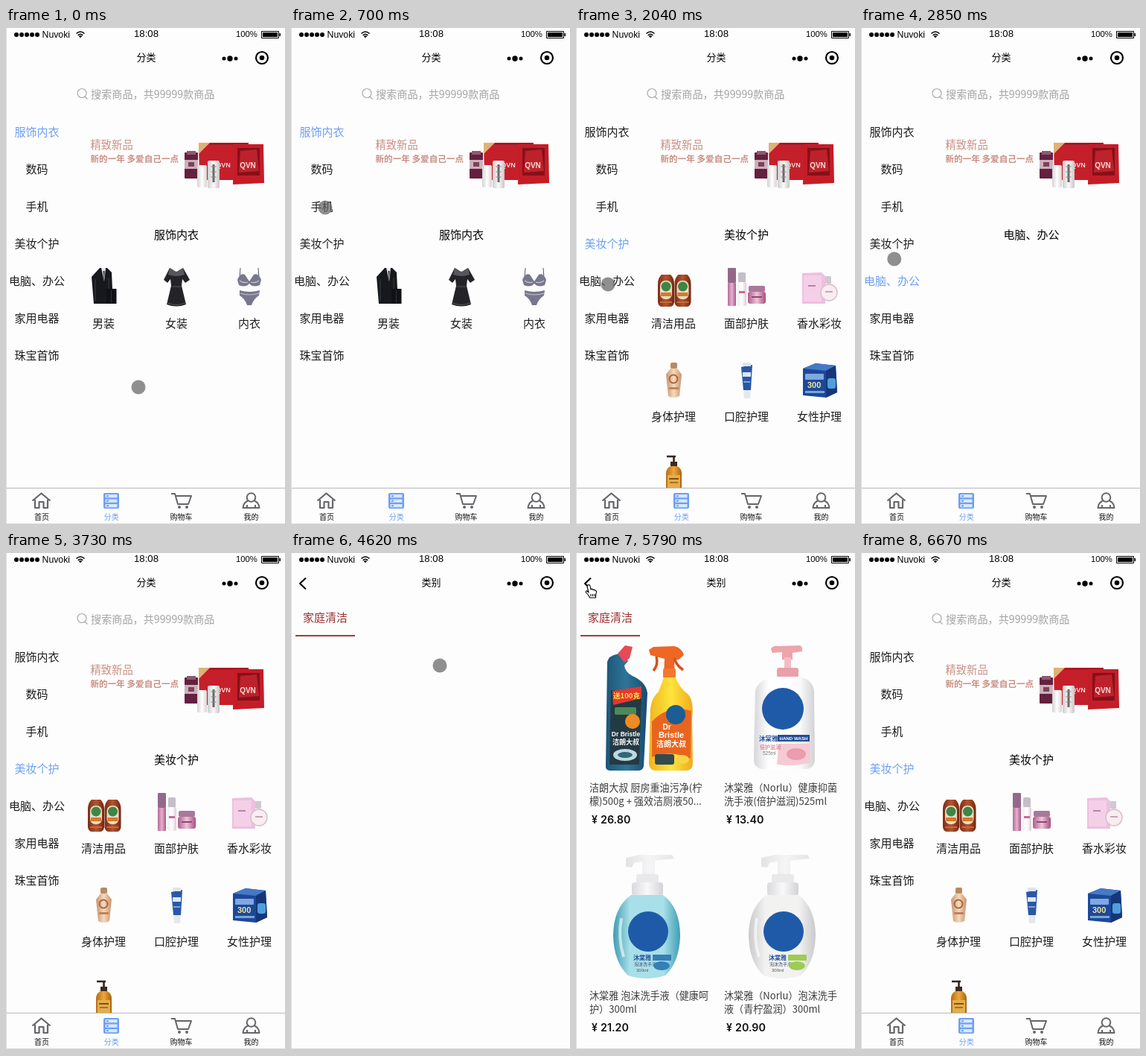
These frames come from a looping animation (375x667 px, 7.21 s). An HTML page with a canvas:

```html
<!DOCTYPE html>
<html lang="zh-CN">
<head>
<meta charset="utf-8">
<title>分类</title>
<style>
html, body { margin: 0; width: 100%; height: 100%; overflow: hidden; background: #fdfdfd; }
canvas { display: block; width: 375px; height: 667px; }
</style>
</head>
<body>
<canvas id="stage"></canvas>
<script>
const W = 375, H = 667, LOOP = 7210;
const CJK = '"Noto Sans CJK SC", "Noto Sans CJK", sans-serif';
const LATIN = '"Liberation Sans", sans-serif';
const BLUE = '#6c9ff5', INK = '#1d1d1f', PAGE = '#fdfdfd';
const canvas = document.getElementById('stage');
const g = canvas.getContext('2d');
const ratio = window.devicePixelRatio || 1;
canvas.width = W * ratio;
canvas.height = H * ratio;

// Drawing helpers
function rect(x, y, w, h, color, r = 0) {
  g.fillStyle = color;
  g.beginPath();
  g.roundRect(x, y, w, h, r);
  g.fill();
}
function oval(x, y, rx, ry, color) {
  g.fillStyle = color;
  g.beginPath();
  g.ellipse(x, y, rx, ry, 0, 0, Math.PI * 2);
  g.fill();
}
const dot = (x, y, r, color) => oval(x, y, r, r, color);
function ring(x, y, r, color, width) {
  g.strokeStyle = color;
  g.lineWidth = width;
  g.beginPath();
  g.arc(x, y, r, 0, Math.PI * 2);
  g.stroke();
}
function fill(d, color) {
  g.fillStyle = color;
  g.fill(new Path2D(d));
}
function stroke(d, color, width) {
  g.strokeStyle = color;
  g.lineWidth = width;
  g.stroke(new Path2D(d));
}
// y is the vertical middle of the glyphs
function text(s, x, y, size, { color = INK, align = 'left', weight = 400, font = CJK } = {}) {
  g.font = `${weight} ${size}px ${font}`;
  g.textAlign = align;
  g.fillStyle = color;
  g.fillText(s, x, y + size * 0.37);
}
const centered = (s, x, y, size, color = INK) => text(s, x, y, size, { color, align: 'center' });
function shade(x0, x1, ...colors) {
  const grad = g.createLinearGradient(x0, 0, x1, 0);
  colors.forEach((c, i) => grad.addColorStop(i / (colors.length - 1), c));
  return grad;
}

// Category thumbnails
function suit() {
  fill('M126 322L136 322L142 328L143 351L139 370L118 370L115 334Z', '#17181d');
  fill('M128 322L134 322L132 340Z', '#e8e8ee');
  fill('M130.500 326L132.500 326L132 339Z', '#222');
  stroke('M120 337V366M138 335V350', '#3b3d46', 1);
  rect(135, 350, 13.5, 20, '#111216');
  stroke('M141.500 352V369', '#383a42', 0.8);
}
function dress() {
  fill('M220 322L225 325Q229 329 233 325L238 322L247 338L241 342L237 337L236 346L242 371Q229 376 216 371L222 346L221 337L217 342L212 338Z', '#242428');
  fill('M220 322L225 325Q229 329 233 325L238 322L240 331Q229 335 218 331Z', '#56565d');
  stroke('M223 347H235M217 369Q229 374 241 369', '#55555c', 1);
}
function lingerie() {
  stroke('M314 335L315 322M340 335L339 322', '#555568', 1);
  fill('M311 338Q315 328 321 331L327 340L333 331Q339 328 343 338L341 345Q332 349 327 343Q322 349 313 345Z', '#77778d');
  stroke('M314 339Q319 343 325 341M329 341Q335 343 340 339', '#c9c9d7', 1.2);
  fill('M314 352Q327 356 341 352L340 359Q333 363 330 372H324Q321 363 314 359Z', '#77778d');
  stroke('M315 356Q327 360 340 356', '#c4c4d2', 1.2);
}
function cleaners() {
  for (const x of [121, 143.5]) {
    fill(`M${x - 6} 331H${x + 6}Q${x + 11} 335 ${x + 11} 344V368Q${x + 10} 374 ${x + 5} 374H${x - 5}Q${x - 10} 374 ${x - 11} 368V344Q${x - 11} 335 ${x - 6} 331Z`, shade(x - 11, x + 11, '#7a2c18', '#b4552f', '#74260f'));
    rect(x - 8, 339, 16, 25, '#e6dcc2', 7);
    dot(x, 347, 6.5, '#3d8645');
    rect(x - 7, 355, 14, 5, '#d9772f');
    rect(x - 8, 367, 16, 2, '#c76a3c');
  }
}
function skincare() {
  rect(204, 322, 11, 20, '#94688b', 1);
  rect(204, 342, 11, 31, shade(204, 215, '#b9689a', '#e4b1cc', '#a9588b'), 1);
  rect(218, 328, 10, 14, '#c4bec8', 2);
  rect(217, 341, 12, 32, shade(217, 229, '#eee', '#fff', '#e1c9d6'), 2);
  rect(219, 353, 8, 3, '#c96a99');
  rect(232, 346, 22, 8, '#a9789a', 2);
  rect(231, 354, 24, 16, shade(231, 255, '#b05c8c', '#ecc5da', '#a74f80'), 3);
  rect(236, 360, 14, 2, '#8d4a70');
}
function perfume() {
  fill('M304 329L330 328L335 333V370H304Z', '#eebfdf');
  rect(306, 332, 24, 35, '#f3d0e8');
  rect(312, 345, 10, 2, '#b884a4');
  rect(335, 333, 8, 10, '#cfc9d0', 1);
  dot(340, 355, 11.5, '#f8edf1');
  ring(340, 355, 11, '#d9bcc9', 1.4);
  rect(335, 353, 10, 2, '#c7a3b4');
}
function lotion() {
  rect(127, 449, 9, 8, '#b78a62', 2);
  fill('M127 457H136L142 465L139 494Q131 498 124 494L121 465Z', shade(121, 142, '#c9946d', '#f4dabc', '#c9926d'));
  ring(131, 471, 5.5, '#a8653f', 2);
  rect(125, 482, 13, 3, '#c1835c');
}
function toothpaste() {
  fill('M222 455L237 452L235 486H225Z', '#2b57a6');
  rect(224, 449, 11, 5, '#dfe5ee');
  rect(224, 462, 11, 6, '#dce7f5');
  rect(225, 474, 9, 2, '#7ea5dc');
  rect(225.5, 486, 9, 11, '#e4e8ee', 2);
}
function pads() {
  fill('M305 457L322 450L349 453L351 489L336 496L305 493Z', '#1d489a');
  fill('M305 457L322 450L349 453L336 460Z', '#4579c5');
  fill('M336 460L349 453L351 489L336 496Z', '#163679');
  rect(308, 464, 25, 8, '#7fa9df', 1);
  text('300', 311, 479, 11, { color: '#f2e69b', weight: 700, font: LATIN });
  rect(338, 470, 11, 14, '#4f9fdb', 3);
  rect(308, 487, 26, 3, '#79a4db');
}
function shampoo() {
  stroke('M122 575H134M131.500 575V588', '#332520', 2.6);
  rect(127, 582, 9, 7, '#3b2a22');
  fill('M127 588H136Q142 591 142 598V625H121V598Q121 591 127 588Z', shade(121, 142, '#b56c14', '#eca73e', '#ac620e'));
  rect(123, 600, 17, 17, '#e3ae4d');
  rect(125, 604, 13, 2, '#8a4c12');
  rect(126, 609, 11, 2, '#b06f1d');
}

const menu = ['服饰内衣', '数码', '手机', '美妆个护', '电脑、办公', '家用电器', '珠宝首饰'];
const goods = {
  0: [['男装', suit], ['女装', dress], ['内衣', lingerie]],
  3: [['清洁用品', cleaners], ['面部护肤', skincare], ['香水彩妆', perfume],
      ['身体护理', lotion], ['口腔护理', toothpaste], ['女性护理', pads], ['', shampoo]]
};

function statusBar() {
  for (let i = 0; i < 5; i++) dot(14 + i * 7, 9, 3, '#000');
  text('Nuvoki', 48.5, 8, 12.3, { color: '#000', font: LATIN });
  stroke('M94.500 7.500Q100 2.500 105.500 7.500M96.700 9.800Q100 6.700 103.300 9.800', '#000', 1.6);
  fill('M97.800 11Q100 9 102.200 11L100 13.300Z', '#000');
  text('18:08', 188.5, 7.5, 13.2, { color: '#000', align: 'center', font: LATIN });
  text('100%', 309, 8, 11.3, { color: '#000', font: LATIN });
  stroke('M343.500 4.500H366.500V13.500H343.500Z', '#000', 1);
  rect(345, 6, 20, 6, '#000');
  rect(367.5, 7, 1.5, 4, '#000');
}

function header(title) {
  statusBar();
  centered(title, 188.5, 39, 13, '#000');
  dot(293, 41, 2.5, '#000');
  dot(301, 41, 3.7, '#000');
  dot(309, 41, 2.5, '#000');
  ring(344, 40, 8, '#000', 2.2);
  dot(344, 40, 3.3, '#000');
}

function banner() {
  const pink = { color: '#ca9085', weight: 500 };
  text('精致新品', 113.5, 157, 14.3, pink);
  text('新的一年 多爱自己一点', 113.5, 175.5, 11.6, { ...pink, weight: 700 });
  rect(240, 167, 18, 35, '#65203f', 1);
  rect(243, 165, 12, 5, '#8e5a70');
  rect(240, 177, 18, 12, '#cbb0ba');
  rect(245, 180, 8, 6, '#7d4258');
  fill('M259 154H326V162L305 204H260Z', '#c51f2b');
  fill('M275 154H326V157H272Z', '#a91823');
  fill('M259 154H274L259 169Z', '#dfb276');
  fill('M306 156H346L347 208L305 210Z', '#c41d28');
  fill('M311 161H341V198H311Z', '#861019');
  fill('M315 165L337 163L340 192L313 194Z', '#bd222c');
  const label = { color: '#f7dcd6', align: 'center', weight: 700, font: LATIN };
  text('QVN', 292, 184, 9, label);
  text('QVN', 325, 184, 10, label);
  rect(257, 184, 13, 30, shade(257, 270, '#d5d1d2', '#fff', '#d8d3d4'), 2);
  rect(271, 178, 16, 37, shade(271, 287, '#d0cccd', '#fafafa', '#c9c5c6'), 2);
  stroke('M279 183V207', '#6f6765', 3);
  stroke('M275.500 186H282.500M275.500 193H282.500M275.500 200H282.500', '#8d8583', 1.2);
}

function tabBar() {
  rect(0, 617, W, 50, PAGE);
  rect(0, 617, W, 1, '#b9b9bd');
  const grey = '#66666a';
  stroke('M35.500 634.500L47.500 624.500L59.500 634.500M39 633V644H44.500V636H50.500V644H56V633', grey, 2.2);
  rect(131, 624, 21, 21, BLUE, 2);
  for (let i = 0; i < 3; i++) {
    rect(133.5, 626 + i * 6.5, 16, 4.3, '#d9e7ff');
    rect(135, 627.2 + i * 6.5, 3, 2, BLUE);
  }
  stroke('M222 625H227L231 639H245L249 628H228', grey, 2);
  dot(233, 643, 2, grey);
  dot(243, 643, 2, grey);
  ring(329.500, 630, 5.8, grey, 2);
  stroke('M325 634.500Q319 637 318.500 644H340.500Q340 637 334 634.500M324 640V644M335 640V644', grey, 2);
  ['首页', '分类', '购物车', '我的'].forEach((s, i) =>
    centered(s, 48 + i * 93.8, 656, 10, i === 1 ? BLUE : '#111'));
}

function categoryPage(selected) {
  header('分类');
  ring(102, 87.5, 6, '#aaa', 1.2);
  stroke('M106 92L109.500 95.500', '#aaa', 1.2);
  text('搜索商品，共99999款商品', 114, 88.5, 14.15, { color: '#a3a3a6', weight: 300 });
  menu.forEach((s, i) => centered(s, 41.5, 139.5 + i * 50, 15, i === selected ? BLUE : INK));
  banner();
  centered(menu[selected], 229, 277.5, 15, '#000');
  (goods[selected] || []).forEach(([name, draw], i) => {
    draw();
    centered(name, 131 + (i % 3) * 98, 396.5 + Math.floor(i / 3) * 125, 15);
  });
  tabBar();
}

// Product pictures
const badge = (x, y, r) => dot(x, y, r, '#1f5aa8');
function kitchenSet() {
  fill('M42 146Q44 138 54 136L63 134L70 145L65 151Q66 160 76 165Q94 173 96 188L91 286Q90 292 83 292H46Q39 292 40 284Z', shade(39, 96, '#1c5577', '#2e7598', '#174b6c'));
  fill('M56 135L66 124L76 126L72 141L65 147Z', '#e54a55');
  fill('M47 184L88 188L85 284H45Z', '#243a43');
  fill('M49 185L88 179V195L50 204Z', '#e5382e');
  text('送100克', 68, 191, 9.5, { color: '#ffe94a', align: 'center', weight: 700 });
  rect(52, 207, 29, 10, '#4d8a56', 2);
  dot(76, 226, 10, '#ee8b23');
  const white = { color: '#fff', align: 'center', weight: 700 };
  text('Dr Bristle', 67, 243, 8.5, { ...white, font: LATIN });
  text('洁朗大叔', 67, 254, 9, white);
  oval(66, 271, 16, 8, '#bcd9df');
  oval(66, 271, 10, 4, '#356778');

  fill('M98 130L104 126L132 125Q142 127 145 137L138 143L132 144L133 166H118L119 142L100 137Z', '#ee6725');
  stroke('M108 139Q111 150 104 158M132 141Q135 151 144 157', '#d84f1c', 3.5);
  rect(117, 155, 17, 13, '#f2792c', 2);
  fill('M118 167H134Q138 180 151 190Q159 200 156 222L157 282Q157 291 149 292H106Q98 291 98 282L100 208Q102 194 111 186Z', shade(98, 158, '#f0b51b', '#ffe43c', '#eeaa1a'));
  fill('M102 226Q126 202 155 212L154 276Q130 264 102 274Z', '#e9651f');
  dot(134, 217, 13, '#1c5d96');
  text('Dr', 122, 233, 10, { ...white, font: LATIN });
  text('Bristle', 128, 244, 11, { ...white, font: LATIN });
  text('洁朗大叔', 128, 256, 10, white);
  rect(106, 270, 26, 14, '#324a50', 3);
  oval(143, 277, 9, 6, '#f4d548');
}
function handWash() {
  fill('M262 129Q264 124 273 125L301 124Q305 126 304 132L291 134V143H277V133L264 134Z', '#eda4ab');
  rect(280, 140, 9, 18, '#f2bdc2');
  rect(270, 154, 29, 13, '#eaa0a9', 3);
  fill('M270 166H299Q318 169 320 185L321 278Q320 289 309 290H250Q239 288 239 278L241 185Q244 169 270 166Z', shade(238, 322, '#d4d4d8', '#fff', '#fff', '#fafafa', '#d0d0d4'));
  badge(278, 209, 28);
  text('沐棠雅', 246, 249, 8.5, { color: '#1d4f98', weight: 700 });
  rect(271, 244, 43, 9, '#234e97');
  text('HAND WASH', 292.5, 248.5, 6.2, { color: '#fff', align: 'center', weight: 700, font: LATIN });
  fill('M272 256H315V281Q295 287 270 284Z', '#f5cbd3');
  text('倍护滋润', 247, 260, 7, { color: '#cb5c78' });
  text('525ml', 251, 269, 6.5, { color: '#777', font: LATIN });
  oval(296, 270, 13, 8, '#e99dae');
}
function foamWash(x, edge, mid, accent) {
  g.save();
  g.translate(x, 0);
  fill('M-28 409L-9 405H34L37 410L11 413V434H-6V414L-17 416L-20 422L-28 421Z', shade(-30, 38, '#e2e2e5', '#f5f5f6', '#e4e4e7'));
  rect(-14, 431, 30, 13, '#e9e9ec', 3);
  rect(-20, 442, 42, 18, shade(-20, 22, '#dadade', '#f8f8f9', '#d3d3d7'), 4);
  fill('M-21 459Q-45 476 -45 514Q-44 549 -25 567Q0 575 25 567Q44 549 45 514Q45 476 22 459Z', shade(-45, 45, edge, mid, mid, mid, edge));
  stroke('M-34 490Q-39 516 -31 542', 'rgba(255,255,255,.6)', 4);
  badge(2, 508, 27);
  text('沐棠雅', -18, 543, 8, { color: '#1d4f98', weight: 700 });
  rect(8, 539, 25, 8, accent);
  text('泡沫洗手液', -17, 552, 6, { color: '#456' });
  text('300ml', -14, 560, 6, { color: '#555', font: LATIN });
  oval(20, 554, 11, 6, accent);
  g.restore();
}

const products = [
  ['洁朗大叔 厨房重油污净(柠', '檬)500g + 强效洁厕液50...', '26.80', kitchenSet],
  ['沐棠雅（Norlu）健康抑菌', '洗手液(倍护滋润)525ml', '13.40', handWash],
  ['沐棠雅 泡沫洗手液（健康呵', '护）300ml', '21.20', () => foamWash(95, '#3f9db4', '#a9dfe8', '#347fb5')],
  ['沐棠雅（Norlu）泡沫洗手', '液（青柠盈润）300ml', '20.90', () => foamWash(277, '#c9c9cc', '#f2f2f1', '#9fcb55')]
];

function listPage(tab, loaded) {
  header('类别');
  stroke('M20 33.500L12 41L20 48.500', '#000', 2);
  if (tab) {
    text('家庭清洁', 16, 86.5, 15, { color: '#9b3131' });
    rect(6, 110, 80, 2, '#a03a3a');
  }
  if (!loaded) return;
  const thin = { color: '#3c3c3e', weight: 300 };
  const bold = { color: '#111', weight: 600, font: 'Inter, sans-serif' };
  products.forEach(([a, b, price, draw], i) => {
    const x = 18 + (i % 2) * 181, y = 315 + Math.floor(i / 2) * 279;
    draw();
    text(a, x, y, 13.1, thin);
    text(b, x, y + 18, 13.1, thin);
    text('¥', x + 3, y + 43, 14, bold);
    text(price, x + 15, y + 43, 14.3, bold);
  });
}

// Pointer moves: start, end, steps, from, to
const moves = [
  [80, 700, 8, [178, 482], [46, 241]],
  [1150, 1500, 5, [46, 241], [45, 292]],
  [1770, 2040, 4, [45, 292], [43, 344]],
  [2310, 3030, 9, [43, 344], [45, 305]],
  [3120, 3210, 2, [45, 305], [49, 291]],
  [3390, 3730, 5, [49, 291], [132, 352]],
  [4180, 4620, 6, [132, 352], [200, 151]],
  [5070, 5790, 9, [200, 151], [20, 51]],
  [6050, 6670, 8, [20, 51], [400, 700]]
];
const ease = p => p * p * (3 - 2 * p);

function pointerAt(t) {
  let pos = moves[0][3];
  for (const [start, end, steps, from, to] of moves) {
    if (t < start) break;
    const k = Math.floor((t - start) / (end - start) * (steps - 1) + 0.02) + 1;
    const p = ease(Math.min(1, k / steps));
    pos = from.map((v, i) => v + (to[i] - v) * p);
  }
  return pos;
}

function pointer(t) {
  if (t >= 3730 && t < 4180) return;
  const [x, y] = pointerAt(t);
  if (y > 64) {
    dot(x, y, 9.5, 'rgba(100,100,100,.72)');
    return;
  }
  g.save();
  g.translate(x - 8, y - 9);
  const hand = 'M4 1Q6 0 7 2L8 7Q10 5.500 11 7.500Q13 6.500 13.500 8.500Q15.500 8 15.500 10.500L14.500 15V18H6.500L5 15L1 10.500Q1 8.500 3 9L5 11L3 3Q3 1.500 4 1Z';
  fill(hand, '#fff');
  stroke(hand + 'M8 13V16M10.500 13V16M13 13V16', '#000', 1.1);
  g.restore();
}

function selectedAt(t) {
  if (t < 1150) return 0;
  if (t < 1770) return 2;
  return t >= 2310 && t < 3390 ? 4 : 3;
}

function draw(t) {
  g.setTransform(ratio, 0, 0, ratio, 0, 0);
  g.lineJoin = 'round';
  rect(0, 0, W, H, PAGE);
  if (t >= 3910 && t < 6050) listPage(t >= 4180, t >= 4710);
  else categoryPage(selectedAt(t));
  rect(0, 0, 1, H, '#dedee0');
  rect(0, 665, W, 2, '#d2d2d5');
  pointer(t);
}

const begin = performance.now();
function frame() {
  draw((performance.now() - begin) % LOOP);
  requestAnimationFrame(frame);
}
frame();
</script>
</body>
</html>
```
